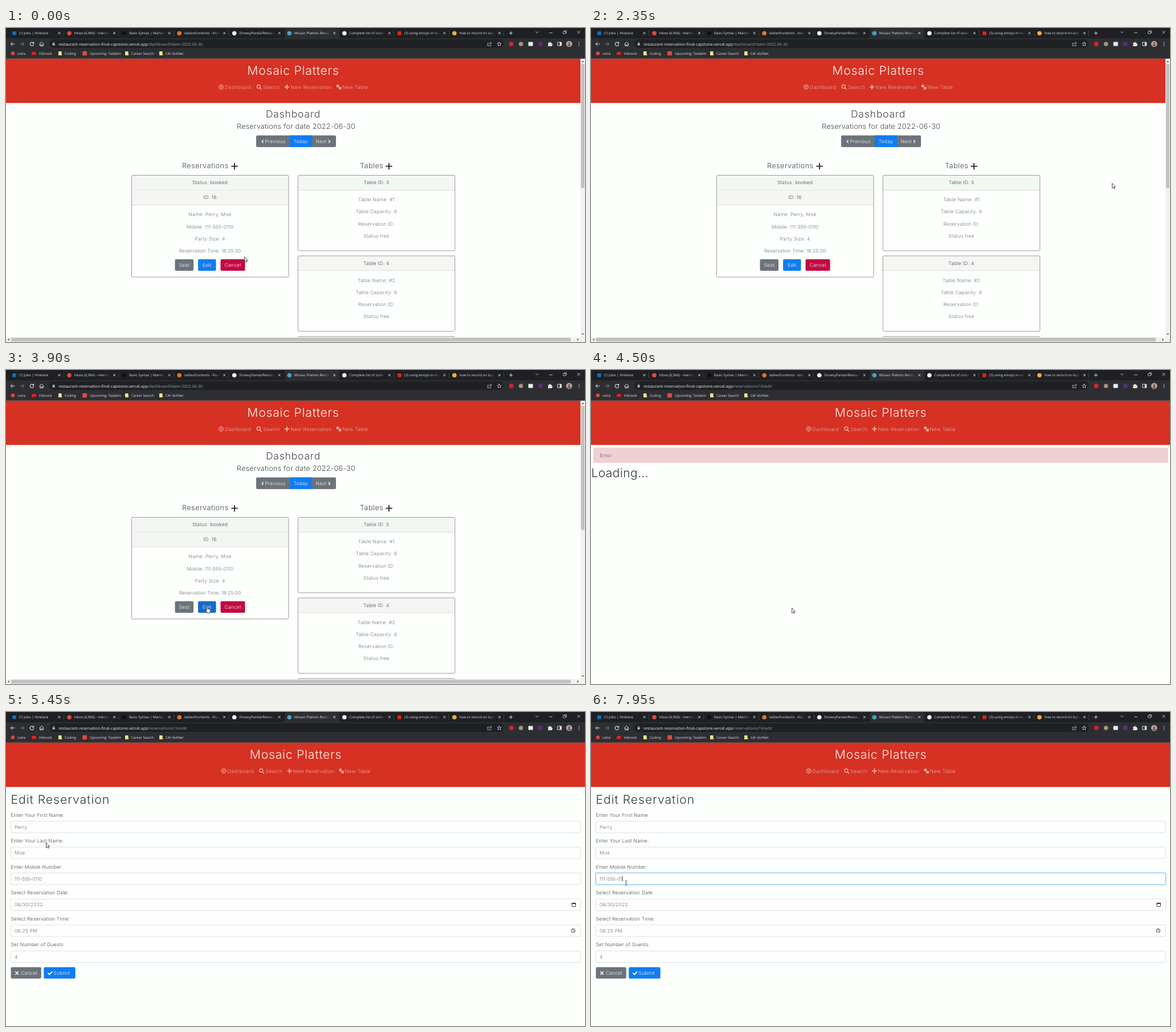
Animation, 1016 px wide and 551 px high, one loop 8000 ms. Source, as an HTML page:

```html
<!DOCTYPE html>
<html lang="en">
<head>
<meta charset="utf-8">
<title>Reservation dashboard</title>
<style>
html, body { margin: 0; width: 100%; height: 100%; overflow: hidden; background: #fdfffc; }
svg { display: block; }
text { font-family: Inter, "Open Sans", sans-serif; font-weight: 350; font-optical-sizing: none; text-rendering: geometricPrecision; white-space: pre; }
.ui text { font-family: "Open Sans", "Noto Sans", sans-serif; font-weight: 400; }
.line { fill: none; stroke-linecap: round; stroke-linejoin: round; }
</style>
</head>
<body>
<svg id="stage" width="1016" height="551" viewBox="0 0 1016 551"></svg>
<script>
const LOOP = 8000, LOAD_AT = 4200, FORM_AT = 4650, FOCUS_AT = 6650;
const PHONE = '111-555-0110', DELETES = [7500, 7700];
const BLUE = '#107cf0', GREY = '#6c737a', RED = '#c20a41', MUTED = '#72777c', DARK = '#45484b';

// y is the vertical centre of the capitals
const text = (x, y, s, o = {}) => {
  const { size = 8.5, fill = DARK, at = 'start', gap = .028, id = '' } = o;
  return `<text ${id && `id="${id}"`} x="${x}" y="${y + size * .36}" font-size="${size}" fill="${fill}" text-anchor="${at}" letter-spacing="${gap * size}">${s}</text>`;
};
const mid = (x, y, s, o) => text(x, y, s, { at: 'middle', ...o });
const rect = (x, y, w, h, fill, r = 0, extra = '') =>
  `<rect x="${x}" y="${y}" width="${w}" height="${h}" fill="${fill}" rx="${r}" ${extra}/>`;
const dot = (x, y, r, fill) => `<circle cx="${x}" cy="${y}" r="${r}" fill="${fill}"/>`;
const line = (d, stroke, w = 1) => `<path class="line" d="${d}" stroke="${stroke}" stroke-width="${w}"/>`;
const cross = (x, y, r, c, w) => line(`M${x - r} ${y - r}l${2 * r} ${2 * r}m0 ${-2 * r}l${-2 * r} ${2 * r}`, c, w);
const plus = (x, y, r, c, w) => line(`M${x - r} ${y}h${2 * r}M${x} ${y - r}v${2 * r}`, c, w);
const ring = (x, y, r, c, w = 1) => `<circle cx="${x}" cy="${y}" r="${r}" fill="none" stroke="${c}" stroke-width="${w}"/>`;
const group = (id, body, extra = '') => `<g id="${id}" ${extra}>${body}</g>`;

function browser() {
  const strip = '#1e2023', bar = '#2d2e32', ink = '#dfe1e5', pitch = 96.55;
  const ui = { size: 6.1, fill: ink, gap: 0 };
  const tabs = [
    ['(1) Jobs | Hirelane', '#1670b8', 1], ['Inbox (6,966) - merrick', '#e04a3f'],
    ['Basic Syntax | Markdown', '#111', 1], ['tableofcontents - Mark', '#d9772b'],
    ['DrowsyPanda/Restaur', '#f2f2f2'], ['Mosaic Platters Restau', '#4aa3b8'],
    ['Complete list of codene', '#f2f2f2'], ['(3) using emojis in mar', '#e3231f', 1],
    ['how to record on lapto', '#e8b04a']
  ];
  const fade = (id, c) => `<linearGradient id="${id}"><stop stop-color="${c}" stop-opacity="0"/><stop offset="1" stop-color="${c}"/></linearGradient>`;
  let s = `<defs>${fade('fadeTab', strip)}${fade('fadeOn', bar)}</defs>`;
  s += rect(0, 0, 1016, 18, strip) + rect(0, 18, 1016, 35.8, bar);
  s += `<path d="M487 18q2.5 0 2.5-3V4q0-3 3-3H582q3 0 3 3v11q0 3 2.5 3z" fill="${bar}"/>`;
  tabs.forEach(([name, color, square], i) => {
    const x = 14.5 + i * pitch, on = i === 5;
    s += square ? rect(x - 3.3, 6, 6.6, 6.4, color, 1) : dot(x, 9.2, 3.8, color);
    s += `<svg x="${x + 8.5}" width="62.5" height="18">${text(0, 9, name, ui)}</svg>`;
    s += rect(x + 59, 2, 12.5, 14, `url(#${on ? 'fadeOn' : 'fadeTab'})`);
    s += cross(x + 79, 9, 1.8, ink, .9);
    if (i !== 4 && i !== 5) s += rect(x + 86.5, 4, .6, 10, '#55575b');
  });
  s += plus(886, 9, 2.7, ink, 1);
  s += line('M929.5 6.5l2.3 2.2 2.3-2.2', ink, .8) + line('M953.5 8.5h5', ink, .8);
  s += line('M978 6h4v4h-4zM979.5 6v-1.3h4v4h-1.3', ink, .7) + cross(1005, 7.5, 2.2, ink, .8);

  // toolbar
  s += rect(76, 20, 797, 15, strip, 7.5);
  s += line('M15 28H8.5M11.3 25l-3 3 3 3', ink) + line('M25 28h6.5M28.7 25l3 3-3 3', '#808387');
  s += line('M48 26.2a3.2 3.2 0 1 0 .6 2.6M48.6 24.5v2.2h-2.3', ink, 1.1);
  s += line('M58.7 28.2l3.8-3.6 3.8 3.6M59.8 27.8v3.7h2v-2h1.4v2h2v-3.7', ink);
  s += rect(81.7, 27, 4, 3.6, '#b8bbbf', .5) + line('M82.5 27v-1a1.2 1.2 0 0 1 2.4 0v1', '#b8bbbf', .7);
  s += text(92, 28, '<tspan>restaurant-reservation-final-capstone.vercel.app</tspan><tspan id="path" fill="#9aa0a6"></tspan>', { size: 7, fill: '#f1f3f4', gap: 0 });
  s += line('M847 26.5h-2v4.8h6v-1.8M847.5 29q.5-2.8 4.3-2.8M850 24.5l1.9 1.7-1.9 1.7', '#c3c6ca', .8);
  s += line('M865.5 24.6l1 2.3 2.5.2-1.9 1.7.6 2.5-2.2-1.3-2.2 1.3.6-2.5-1.9-1.7 2.5-.2z', ink, .8);
  s += dot(886.7, 28, 3.9, '#d8232a') + dot(903.6, 28, 3.8, '#a8937c') + rect(916.6, 24.5, 8, 7, '#eceff1', .6);
  s += dot(937.6, 28, 4, '#5a2f78');
  s += `<path d="M951 26h2a1.4 1.4 0 0 1 2.8 0h2v2a1.4 1.4 0 0 1 0 2.8v1.2h-6.8v-2.2a1.3 1.3 0 0 0 0-2.3z" fill="${ink}"/>`;
  s += line('M968.2 25h6.5v6h-6.5z', ink) + rect(971.7, 25, 3, 6, ink);
  s += dot(988.2, 28, 5.3, '#b9aaa6') + dot(988.2, 26.6, 1.9, '#7a5a50') + rect(985.4, 28.6, 5.6, 3.6, '#7a5a50', 1.8);
  s += [25.3, 28, 30.7].map(y => dot(1005.5, y, .8, ink)).join('');

  // bookmarks
  const folder = x => rect(x - 3, 41, 5.6, 7, '#f3e38c', .7) + rect(x + 1.5, 45, 1.8, 3, '#d9bf55');
  s += dot(12, 44.5, 3.3, '#d9483b') + text(20, 44.5, 'Letra', ui);
  s += rect(45.3, 42, 7.4, 5.2, '#e3231f', 1.3) + text(57.5, 44.5, 'Vidnook', ui);
  s += folder(95) + text(103, 44.5, 'Coding', ui);
  s += rect(134.2, 40.7, 7.8, 7.6, '#dc4c3e', 1) + text(147, 44.5, 'Upcoming: Taskelm', ui);
  s += folder(212) + text(220, 44.5, 'Career Search', ui);
  s += folder(272) + text(280, 44.5, 'C#/ dotNet', ui);
  return group('chrome', s, 'class="ui"');
}

function banner() {
  const c = '#edaca2', nav = { fill: c, size: 8.7 };
  return rect(0, 53.8, 1016, 77.8, '#d63122') + group('banner',
    mid(504, 74.3, 'Mosaic Platters', { size: 21.2, fill: '#fff3f0', gap: .035 }) +
    ring(377.5, 103.5, 3.8, c, 1.2) + line('M375.7 102l1.8 2 1.8-2M377.5 104v1.5', c, 1.1) +
    text(384, 104, 'Dashboard', nav) +
    ring(443.3, 102.8, 3, c, 1.4) + line('M445.6 105.2l2.4 2.5', c, 1.6) + text(451, 104, 'Search', nav) +
    plus(493, 103.5, 3.4, c, 2) + text(499.3, 104, 'New Reservation', nav) +
    rect(580, 99.5, 4.5, 4.5, c, .5) + rect(583.5, 103, 5, 5, c, .5, 'stroke="#d63122" stroke-width=".6"') +
    text(590, 104, 'New Table', nav));
}

const card = (x, y, h, heads) => rect(x, y, 275.5, h, '#fdfffc', 2) +
  heads.map((s, i) => rect(x, y + i * 26, 275.5, 26, '#f4f6f3') + rect(x, y + 25.5 + i * 26, 275.5, .8, '#d6d8d6') +
    mid(x + 137.5, y + 12.7 + i * 26, s)).join('') +
  rect(x, y, 275.5, h, 'none', 2, 'stroke="#8f918f" stroke-width=".9"');

const buttons = [
  { name: 'Seat', x: 296.5, w: 32.5, fill: GREY, hover: '#596067' },
  { name: 'Edit', x: 337, w: 31.5, fill: BLUE, hover: '#146bca' },
  { name: 'Cancel', x: 376.5, w: 43, fill: RED, hover: '#a00836' }
];

function dashboard() {
  const white = { fill: '#f5f8fa' }, big = { size: 12.7, gap: .035 };
  let s = mid(504, 150.5, 'Dashboard', { size: 17.4, gap: .05 });
  s += mid(509, 172, 'Reservations for date 2022-06-30', { size: 12.7, gap: .015 });
  s += rect(439, 188.5, 140, 20.5, GREY, 2) + rect(498, 188.5, 39, 20.5, BLUE);
  s += line('M451.2 197l-2 2.2 2 2.2', '#fff', 1.4) + line('M566.5 197l2 2.2-2 2.2', '#fff', 1.4);
  s += text(454.5, 198.7, 'Previous', white) + mid(517.3, 198.7, 'Today', white) + text(543.5, 198.7, 'Next', white);
  s += text(309, 241.8, 'Reservations', big) + plus(401, 242.7, 5, '#222', 1.8);
  s += text(621, 241.8, 'Tables', big) + plus(672, 242.7, 5, '#222', 1.8);
  s += card(220.5, 258.5, 178.5, ['Status: booked', 'ID: 16']);
  ['Name: Perry, Moe', `Mobile: ${PHONE}`, 'Party Size: 4', 'Reservation Time: 18:25:00'].forEach((row, i) =>
    s += mid(358, 327.3 + i * 21.2, row, { fill: MUTED, gap: i % 2 ? .005 : .028 }));
  s += buttons.map(b => rect(b.x, 405.8, b.w, 20.2, b.fill, 2, `id="${b.name}"`) + mid(b.x + b.w / 2, 415.7, b.name, white)).join('');
  [3, 4, 5].forEach((id, i) => {
    const y = 258.5 + i * 141.4;
    s += card(512.3, y, 132.3, ['Table ID: ' + id]);
    [`Table Name: #${i + 1}`, 'Table Capacity: 6', 'Reservation ID:', 'Status:free'].forEach((row, k) =>
      s += mid(650, y + 42.7 + k * 21.2, row, { fill: MUTED }));
  });
  const arrow = d => `<path d="${d}" fill="#555"/>`;
  s += rect(1008, 54, 8, 489, '#f1f1f1') + rect(1009, 63, 6, 217.5, '#c1c1c1');
  s += rect(0, 542.5, 1016, 8.5, '#f1f1f1') + rect(9, 543.5, 982, 6.5, '#c1c1c1');
  s += arrow('M1010 60l2.2-2.5 2.2 2.5z') + arrow('M1010 536l2.2 2.5 2.2-2.5z');
  s += arrow('M5.5 544.5l-2.5 2.2 2.5 2.2z') + arrow('M1002.5 544.5l2.5 2.2-2.5 2.2z');
  return group('dash', s);
}

const loading = () => group('load',
  rect(4, 136.3, 1009, 26.7, '#efd0d5', 2) + text(15.5, 149.5, 'Error:', { fill: '#7c4850' }) +
  text(.5, 180.3, 'Loading...', { size: 21.2, fill: '#36393c', gap: .015 }));

function form() {
  const white = { fill: '#f5f8fa' };
  let s = text(8.5, 153.5, 'Edit Reservation', { size: 21.2, fill: '#36393c', gap: .044 });
  [['Enter Your First Name:', 'Perry'], ['Enter Your Last Name:', 'Moe'], ['Enter Mobile Number:', PHONE],
   ['Select Reservation Date:', '06/30/2022'], ['Select Reservation Time:', '06:25 PM'], ['Set Number of Guests:', '4']
  ].forEach(([label, value], i) => {
    const y = 180.5 + i * 45.55, box = (fill, stroke, w) => rect(8.5, y + 11, 1000, 20.3, fill, 2, `stroke="${stroke}" stroke-width="${w}"`);
    s += text(8.5, y, label) + box('#fdfffc', '#d6dadc', .8);
    if (i === 2) s += group('focus', box('none', '#cfe5fd', 2.6) + box('#fdfffc', '#80bdff', 1));
    s += text(15, y + 21.2, value, { fill: '#696f75', gap: i === 2 ? -.015 : .028, id: i === 2 ? 'phone' : '' });
  });
  s += rect(0, 288, .8, 9, '#222', 0, 'id="caret"');
  s += rect(993, 335.3, 6.5, 6, 'none', .5, 'stroke="#222" stroke-width=".9"') + rect(993, 335, 6.5, 1.8, '#222');
  s += ring(995.3, 383.6, 3.2, '#222', .9) + line('M995.3 381.7v2l1.4.8', '#222', .7);
  s += rect(8.6, 447.7, 53.2, 20, GREY, 2) + cross(19.2, 458.2, 2.3, '#fff', 1.6) + text(26, 457.7, 'Cancel', white);
  s += rect(66.3, 447.7, 55.4, 20, BLUE, 2) + line('M74 458.3l2.3 2.4 4.3-4.6', '#fff', 1.9) + text(83.3, 457.7, 'Submit', white);
  return group('form', s);
}

const cursor = () => group('cursor',
  group('arrow', '<path d="M0 0V8.6L2 6.8 3.3 9.7 4.7 9 3.4 6.3H6z" fill="#fff" stroke="#222" stroke-width=".8"/>') +
  group('hand', '<path d="M-.9 .9q0-1.1 .9-1.1t.9 1.1V4.2l3.9 .8q1.2 .4 1 1.7L5 9.5V11.5H-.2V10L-2.7 6.8q-.4-1.1 .6-1.2L-.9 6.6z" fill="#fff" stroke="#222" stroke-width=".8"/>') +
  group('beam', '<path d="M-1.8-4h1.3L0-3.5 .5-4H1.8M0-3.5V3.5M-1.8 4h1.3L0 3.5 .5 4H1.8" fill="none" stroke="#222" stroke-width=".8"/>'));

const $ = id => document.getElementById(id);
$('stage').innerHTML = rect(0, 0, 1016, 551, '#fdfffc') + banner() + dashboard() + loading() + form() + browser() + cursor();

// time, x, y of the pointer
const route = [
  [0, 418.5, 401.5], [500, 418.5, 401.5], [1100, 488.5, 421.5], [1200, 488.5, 421.5], [1700, 917, 274], [1900, 914.5, 272.5],
  [2450, 914.5, 272.5], [3450, 353, 415], [4200, 353, 415], [4450, 352.5, 417.5], [4750, 352.5, 417.5],
  [5400, 70.5, 229.5], [5700, 70.5, 229.5], [6350, 61.5, 300], [LOOP, 61.5, 300]
];
function pointer(t) {
  const i = route.findIndex(k => k[0] > t), [t0, x0, y0] = route[i - 1], [t1, x1, y1] = route[i];
  const p = (t - t0) / (t1 - t0), e = p * p * (3 - 2 * p);
  return [x0 + (x1 - x0) * e, y0 + (y1 - y0) * e];
}

const show = (id, on) => $(id).setAttribute('visibility', on ? 'inherit' : 'hidden');

function draw(t) {
  const page = t < LOAD_AT ? 'dash' : t < FORM_AT ? 'load' : 'form', onDash = page === 'dash';
  ['dash', 'load', 'form'].forEach(id => show(id, id === page));
  $('banner').setAttribute('transform', `translate(${onDash ? 0 : 4.5} 0)`);
  $('path').textContent = onDash ? '/dashboard?date=2022-06-30' : '/reservations/16/edit';

  const [x, y] = pointer(t);
  let kind = 'arrow';
  for (const b of buttons) {
    const over = onDash && x > b.x && x < b.x + b.w && y > 405.8 && y < 426;
    $(b.name).setAttribute('fill', over ? b.hover : b.fill);
    if (over) kind = 'hand';
  }
  const row = (y - 191.5) % 45.55;
  if (page === 'form' && x > 8 && x < 1008 && row > 0 && row < 20.3) kind = 'beam';
  ['arrow', 'hand', 'beam'].forEach(id => show(id, id === kind));
  $('cursor').setAttribute('transform', `translate(${x} ${y})`);

  const gone = DELETES.filter(d => t >= d), phone = $('phone');
  const value = PHONE.slice(0, PHONE.length - gone.length);
  if (phone.textContent !== value) phone.textContent = value;
  const focused = t >= FOCUS_AT, since = t - (gone.length ? gone[gone.length - 1] : FOCUS_AT);
  show('focus', page === 'form' && focused);
  show('caret', page === 'form' && focused && since % 1000 < 500);
  if (focused) $('caret').setAttribute('x', 15 + phone.getComputedTextLength());
}

const start = performance.now();
(function tick() {
  draw((performance.now() - start) % LOOP);
  requestAnimationFrame(tick);
})();
</script>
</body>
</html>
```
